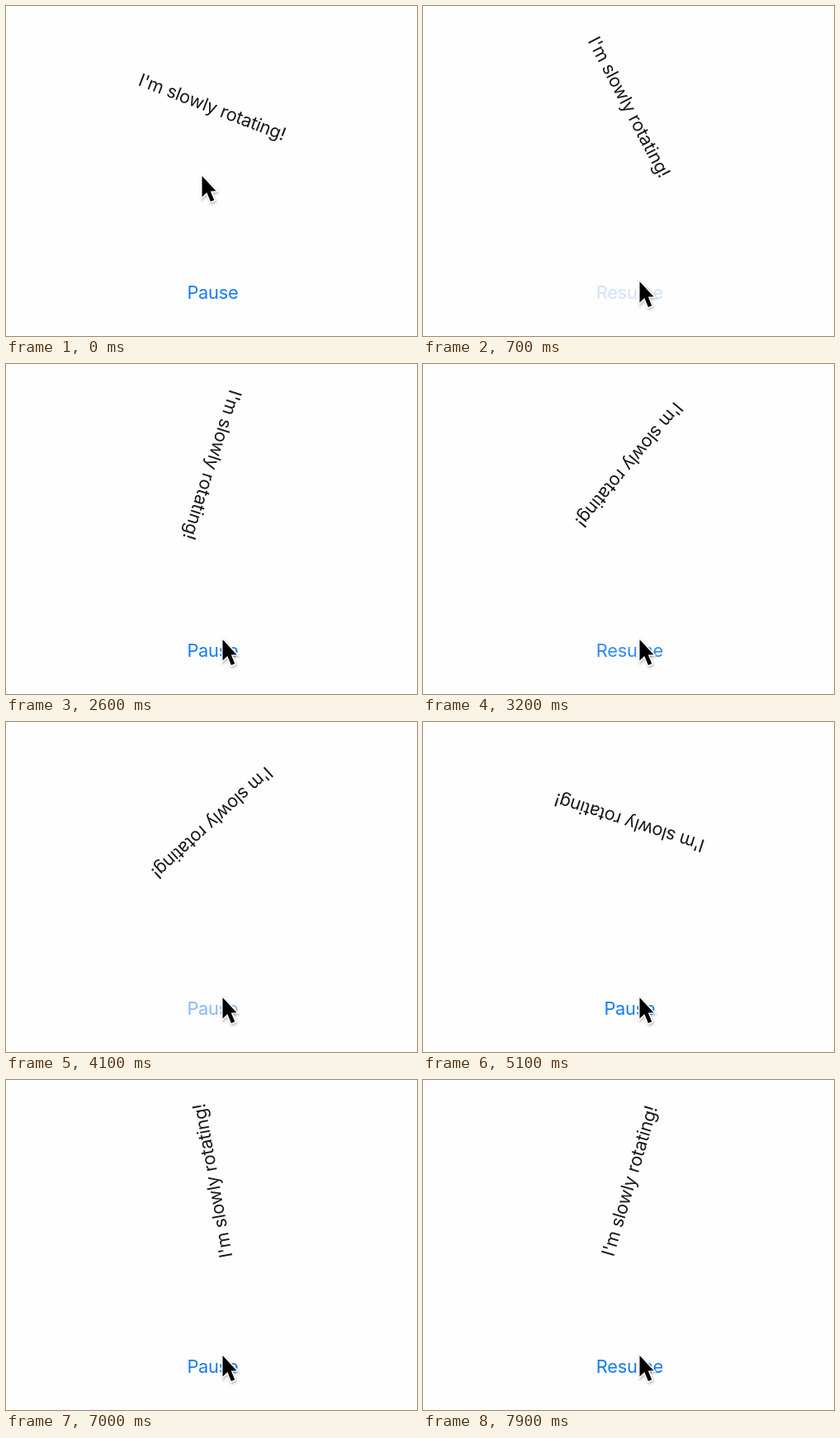
Write an HTML page with a canvas that moves like this. It is 498 px wide and 400 px high and loops after 8000 ms.

```html
<!DOCTYPE html>
<html lang="en">
<head>
<meta charset="utf-8">
<title>Rotating label</title>
<style>
  html, body { margin: 0; width: 100%; height: 100%; overflow: hidden; background: #fefefe; }
  canvas { display: block; width: 498px; height: 400px; }
</style>
</head>
<body>
<canvas id="stage" width="498" height="400"></canvas>
<script>
const ctx = document.getElementById('stage').getContext('2d');
const LOOP = 8000, STEP = 100;
const FONT = '21.8px Inter, "Open Sans", sans-serif';

// Button taps, alternating pause and resume.
const TAPS = [690, 1845, 2970, 3970, 5140, 6005, 7445];
const START = 21, SPEED = 0.06; // degrees, degrees per ms
const PRESS = 35, FADE = 300, DIM = 0.2;

const clamp = x => Math.min(1, Math.max(0, x));
const smooth = x => { x = clamp(x); return x * x * (3 - 2 * x); };
const mix = (a, b, k) => a + (b - a) * k;

// The label turns steadily, but only while it is not paused.
function angleAt(t) {
  let running = t;
  TAPS.forEach((tap, i) => {
    const left = Math.max(0, t - tap);
    running += i % 2 ? left : -left;
  });
  return (START + SPEED * running) * Math.PI / 180;
}

function buttonAt(t) {
  const done = TAPS.filter(tap => tap <= t);
  const pressed = TAPS.some(tap => t >= tap - PRESS && t < tap);
  const last = done.length ? done[done.length - 1] : -LOOP;
  return {
    title: done.length % 2 ? 'Resume' : 'Pause',
    alpha: pressed ? DIM : mix(DIM, 1, smooth((t - last) / FADE))
  };
}

function text(str, color) {
  ctx.font = FONT;
  ctx.letterSpacing = '-0.25px';
  ctx.textAlign = 'center';
  ctx.textBaseline = 'alphabetic';
  ctx.fillStyle = color;
  ctx.fillText(str, 0, 7.8);
}

function at(x, y, paint) {
  ctx.save();
  ctx.translate(x, y);
  paint();
  ctx.restore();
}

function arrow() {
  const shape = new Path2D('M0 0V25.5L5.8 20L10.4 31L14.8 29.2L10.3 18.6L17 18.2Z');
  ctx.lineWidth = 3;
  ctx.strokeStyle = '#fff';
  ctx.save();
  ctx.shadowColor = 'rgba(0,0,0,0.25)';
  ctx.shadowBlur = 3;
  ctx.shadowOffsetX = 1;
  ctx.shadowOffsetY = 2;
  ctx.stroke(shape);
  ctx.restore();
  ctx.fillStyle = '#000';
  ctx.fill(shape);
}

function draw(t) {
  ctx.fillStyle = '#fefefe';
  ctx.fillRect(0, 0, 498, 400);

  at(250, 122.3, () => {
    ctx.rotate(angleAt(t));
    text("I'm slowly rotating!", '#181818');
  });

  const button = buttonAt(t);
  at(250.4, 347.5, () => {
    ctx.globalAlpha = button.alpha;
    text(button.title, '#167bf2');
  });

  const k = smooth(t / 580);
  at(mix(237.5, 262.5, k), mix(206, 334, k), arrow);
}

function tick(now) {
  draw(Math.floor(now % LOOP / STEP) * STEP);
  requestAnimationFrame(tick);
}
requestAnimationFrame(tick);
</script>
</body>
</html>
```
